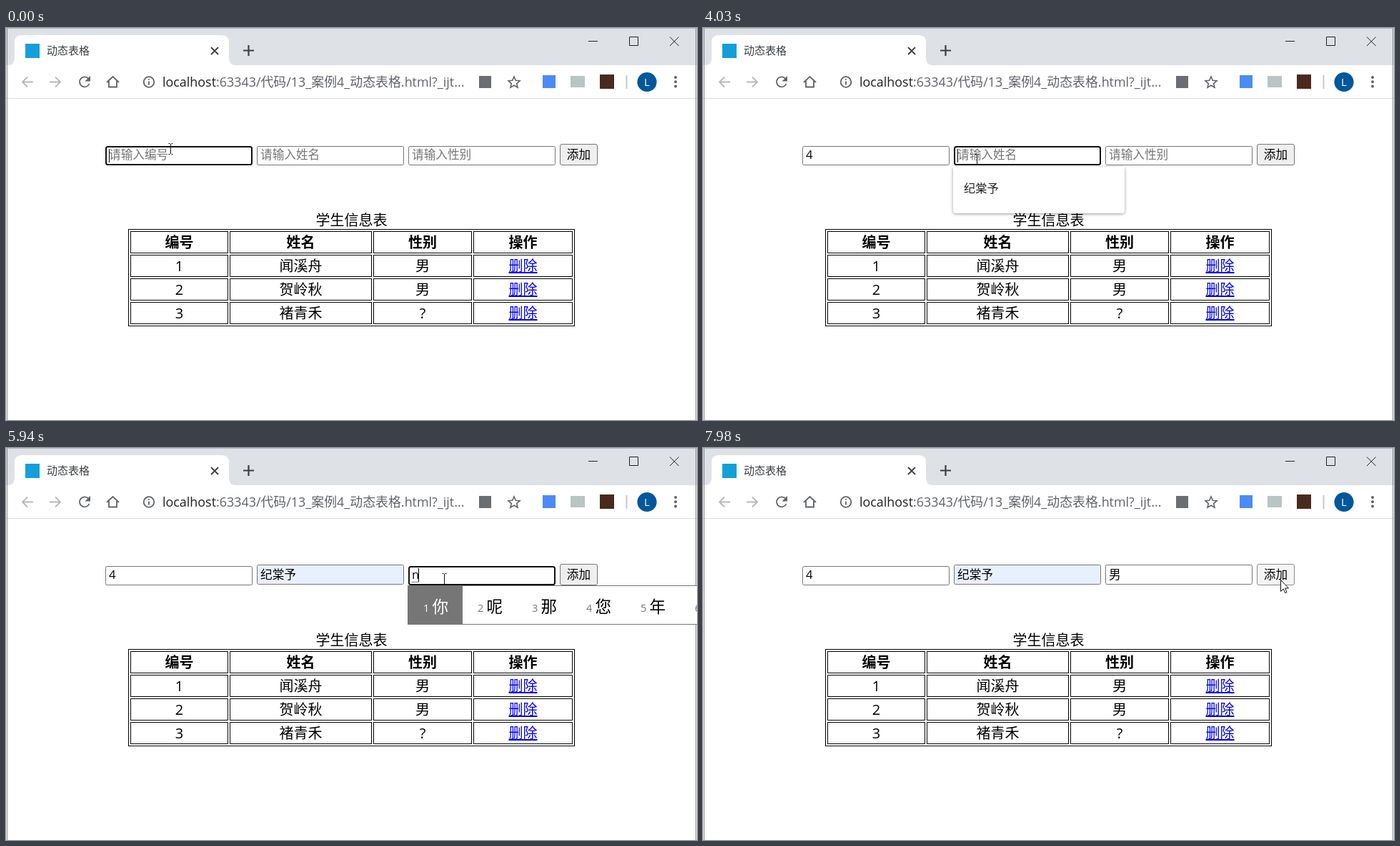
An HTML page that plays this animation: 967x548 px, repeating every 8 s.

```html
<!DOCTYPE html>
<html lang="zh-CN">
<head>
<meta charset="utf-8">
<style>
html, body { margin: 0; width: 100%; height: 100%; overflow: hidden; background: #fff; }
svg { display: block; font-family: 'Open Sans', 'Noto Sans CJK SC', 'Noto Sans CJK', sans-serif; }
.mid { text-anchor: middle; }
.line { fill: none; stroke: #5f6368; stroke-width: 1.8; }
.thin { fill: none; stroke: #222; }
.cells rect { fill: none; stroke: #000; }
.cells { font-size: 20px; }
.form { font-size: 16.67px; }
.popup { filter: drop-shadow(0 1px 2px rgba(0, 0, 0, .4)); }
</style>
</head>
<body>
<svg width="967" height="548">
  <!-- browser window -->
  <path d="M0 0H967V52H0Z" fill="#dee1e6"/>
  <path d="M2 52Q12 52 12 42V20Q12 10 22 10H302Q312 10 312 20V42Q312 52 322 52Z" fill="#fff"/>
  <rect x="27" y="22" width="20" height="20" fill="#149fd8"/>
  <text x="57" y="37" font-size="15" fill="#3c4043">动态表格</text>
  <path class="line" d="M287 27l10 10m0-10l-10 10" style="stroke:#3c4043"/>
  <path class="line" d="M332 31.5h15M339.500 24v15" style="stroke:#3c4043;stroke-width:2.2"/>
  <path class="thin" d="M815 18.500h13M872.500 12.500h12v12h-12zM929 12.500l12.500 12.500m0-12.500l-12.500 12.500"/>
  <path d="M0 98.500H967" stroke="#dadce0"/>
  <path class="line" d="M38 75.500H23m7-7l-7 7 7 7M61 75.500h15m-7-7l7 7-7 7" style="stroke:#b6b8bb"/>
  <path class="line" d="M115.500 71A7 7 0 1 0 116.500 78"/>
  <path d="M118 67v7.500h-7.500z" fill="#5f6368"/>
  <path class="line" d="M141 76l8.500-8 8.500 8M144 74v8.500h11V74"/>
  <circle class="line" cx="200" cy="75.500" r="7.300"/>
  <path class="line" d="M200 74.500v5M200 71v1.800"/>
  <text x="219" y="82" font-size="17.900" fill="#5f6368"><tspan fill="#202124">localhost</tspan>:63343/代码/13_案例4_动态表格.html?_ijt...</text>
  <rect x="662" y="67" width="17" height="17" fill="#6a6d71"/>
  <path class="line" d="M711 68l2.300 5.300 5.700.5-4.300 3.800 1.300 5.600-5-3-5 3 1.300-5.600-4.300-3.800 5.700-.5z" style="stroke-width:1.600"/>
  <rect x="751" y="66" width="18" height="18" fill="#4c8bf5"/>
  <rect x="790" y="67" width="20" height="16" fill="#b9c4c4"/>
  <rect x="831" y="65" width="20" height="20" fill="#4a2a1c"/>
  <path d="M868.500 66v19" stroke="#c4c7cb" stroke-width="2"/>
  <circle cx="897" cy="75.500" r="13.600" fill="#01579b"/>
  <text class="mid" x="897" y="81" font-size="15" fill="#fff">L</text>
  <path d="M937 69h0m0 6.300h0m0 6.300h0" stroke="#5f6368" stroke-width="4" stroke-linecap="round"/>
  <path d="M1.500 0V548M965.500 0V548" stroke="#85878b"/>
  <path d="M0 .5H967" stroke="#b4b8be"/>

  <g class="cells" id="table">
    <text class="mid" x="483.500" y="276">学生信息表</text>
    <rect x="171.500" y="281.500" width="624" height="135"/>
  </g>

  <g class="form">
    <g id="fields"></g>
    <rect id="button" x="775.500" y="162.500" width="52" height="29" rx="2.500"/>
    <text class="mid" x="801.500" y="183">添加</text>
    <path id="dots" stroke="#000" stroke-dasharray="1 1"/>
    <rect id="caret" width="1" height="19"/>
  </g>

  <g id="popup">
    <path class="popup" d="M350 194H590V255Q590 259 586 259H354Q350 259 350 255Z" fill="#fff"/>
    <rect id="pick" x="350" y="203" width="240" height="45" fill="#c8c8c8"/>
    <text x="365" y="230" font-size="16.250" fill="#222">纪棠予</text>
  </g>

  <g id="ime">
    <rect x="562.500" y="192.500" width="420" height="54" fill="#fff" stroke="#767676"/>
    <rect x="562" y="192" width="77" height="55" fill="#767676"/>
  </g>

  <g id="cursor">
    <path id="beam" d="M-3-7.500H-1M1-7.500H3M-3 7.500H-1M1 7.500H3M0-7V7" transform="translate(.5 0)" stroke="#111"/>
    <path id="arrow" d="M.5.5V16.500L4.200 13 6.700 18.700 9 17.700 6.600 12H11.500Z" fill="#fff" stroke="#111"/>
  </g>
</svg>
<script>
const $ = id => document.getElementById(id);

function add(parent, tag, attrs, text = '') {
  const el = document.createElementNS('http://www.w3.org/2000/svg', tag);
  set(el, attrs);
  el.textContent = text;
  return parent.appendChild(el);
}
function set(el, attrs) {
  for (const k in attrs) el.setAttribute(k, attrs[k]);
}
const show = (id, on) => set($(id), { visibility: on ? 'inherit' : 'hidden' });

// student table: outer edges of each column, with 2px gaps between cells
const edges = [[174, 311], [313, 512], [514, 652], [654, 793]];
[['编号', '姓名', '性别', '操作'],
 ['1', '闻溪舟', '男', '删除'],
 ['2', '贺岭秋', '男', '删除'],
 ['3', '褚青禾', '?', '删除']].forEach((row, r) => row.forEach((text, c) => {
  const [a, b] = edges[c], y = 284 + 33 * r, link = r && c === 3;
  add($('table'), 'rect', { x: a + .5, y: y + .5, width: b - a - 1, height: 30 });
  add($('table'), 'text', {
    class: 'mid', x: (a + b) / 2, y: y + 23,
    'font-weight': r ? 400 : 700,
    fill: link ? '#0000ee' : '#000',
    'text-decoration': link ? 'underline' : 'none'
  }, text);
}));

const fields = ['请输入编号', '请输入姓名', '请输入性别'].map((hint, i) => {
  const x = 139 + 212 * i;
  return { x, hint, box: add($('fields'), 'rect', {}), label: add($('fields'), 'text', { x: x + 5, y: 183 }) };
});

const words = [...Array(6)].map((_, i) => {
  const x = 584 + 76 * i;
  add($('ime'), 'text', { x, y: 229, 'font-size': 14.5, fill: i ? '#767676' : '#fff' }, i + 1);
  return add($('ime'), 'text', { x: x + 12.5, y: 230, 'font-size': 22.5, fill: i ? '#000' : '#fff' });
});

// button fill and border
const idle = ['#efefef', '#767676'], over = ['#e5e5e5', '#4f4f4f'], pressed = ['#f5f5f5', '#8d8d8d'];

// Each step changes part of the state; tall counts the fields holding committed Chinese text.
const steps = [
  [0, { id: '', name: '', sex: '', focus: 0, hover: 0, caret: 144, caretY: 169, beam: [230, 169], arrow: 0,
        popup: 0, pick: 0, auto: 0, tall: 0, ime: '', button: idle }],
  [120, { caret: 0 }],
  [270, { id: '4', caret: 152, caretY: 168 }],
  [860, { caret: 0 }],
  [1320, { caret: 152, beam: [244, 170] }],
  [1440, { beam: [286, 173] }],
  [1590, { beam: [372, 184], hover: 1 }],
  [1740, { beam: [382, 184], focus: 1, caret: 356, caretY: 169 }],
  [1860, { popup: .5 }],
  [1980, { popup: 1, beam: [383, 184] }],
  [2510, { caret: 0 }],
  [3040, { caret: 356 }],
  [3470, { caret: 0 }],
  [4030, { caret: 356 }],
  [4180, { beam: 0, arrow: [398, 194], hover: -1 }],
  [4330, { arrow: [428, 220], pick: 1, name: '纪棠予', auto: 1 }],
  [4450, { arrow: [431, 222] }],
  [4580, { popup: 0, pick: 0, tall: 1, caret: 406, caretY: 168 }],
  [4720, { arrow: [470, 212] }],
  [4840, { arrow: [540, 198] }],
  [4960, { arrow: 0, beam: [606, 184], hover: 2 }],
  [5110, { beam: [613, 183], caret: 0 }],
  [5230, { focus: 2, caret: 568, caretY: 169 }],
  [5660, { caret: 0 }],
  [5940, { sex: 'n', ime: '你呢那您年能', caret: 577, caretY: 168 }],
  [6090, { sex: 'na', ime: '那哪拿呐纳娜', caret: 586 }],
  [6210, { sex: 'nan', ime: '男难南喃楠囡', caret: 596 }],
  [6760, { sex: '男', ime: '', caret: 584, tall: 2 }],
  [7290, { caret: 0, beam: [635, 182] }],
  [7410, { beam: [690, 183] }],
  [7530, { beam: [748, 184] }],
  [7680, { beam: 0, arrow: [808, 184], hover: -1, button: over }],
  [7830, { caret: 584 }],
  [7980, { caret: 0, focus: -1, button: pressed }]
];

function draw(t) {
  const s = Object.assign({}, ...steps.filter(([at]) => at <= t).map(([, change]) => change));

  fields.forEach(({ x, hint, box, label }, i) => {
    const value = [s.id, s.name, s.sex][i], on = s.focus === i, raised = i && s.tall >= i;
    const inset = on ? 1 : .5;
    set(box, {
      x: x + inset, y: (raised ? 163 : 165) + inset,
      width: 206 - 2 * inset, height: (raised ? 28 : 27) - 2 * inset, rx: on ? 2.5 : 2,
      fill: i === 1 && s.auto ? '#e8f0fe' : '#fff',
      stroke: on ? '#101010' : s.hover === i ? '#4f4f4f' : '#767676',
      'stroke-width': 2 * inset
    });
    label.textContent = value || hint;
    set(label, { fill: value ? '#000' : '#757575' });
  });

  show('caret', s.caret);
  set($('caret'), { x: s.caret, y: s.caretY });
  set($('button'), { fill: s.button[0], stroke: s.button[1] });

  show('popup', s.popup);
  set($('popup'), { opacity: s.popup });
  show('pick', s.pick);

  show('ime', s.ime);
  show('dots', s.ime);
  set($('dots'), { d: `M568 187.5H${s.caret}` });
  words.forEach((word, i) => word.textContent = s.ime[i] || '');

  show('beam', s.beam);
  show('arrow', s.arrow);
  set($('cursor'), { transform: `translate(${s.beam || s.arrow})` });
}

const start = performance.now();
function tick() {
  draw((performance.now() - start) % 8000);
  requestAnimationFrame(tick);
}
tick();
</script>
</body>
</html>
```
